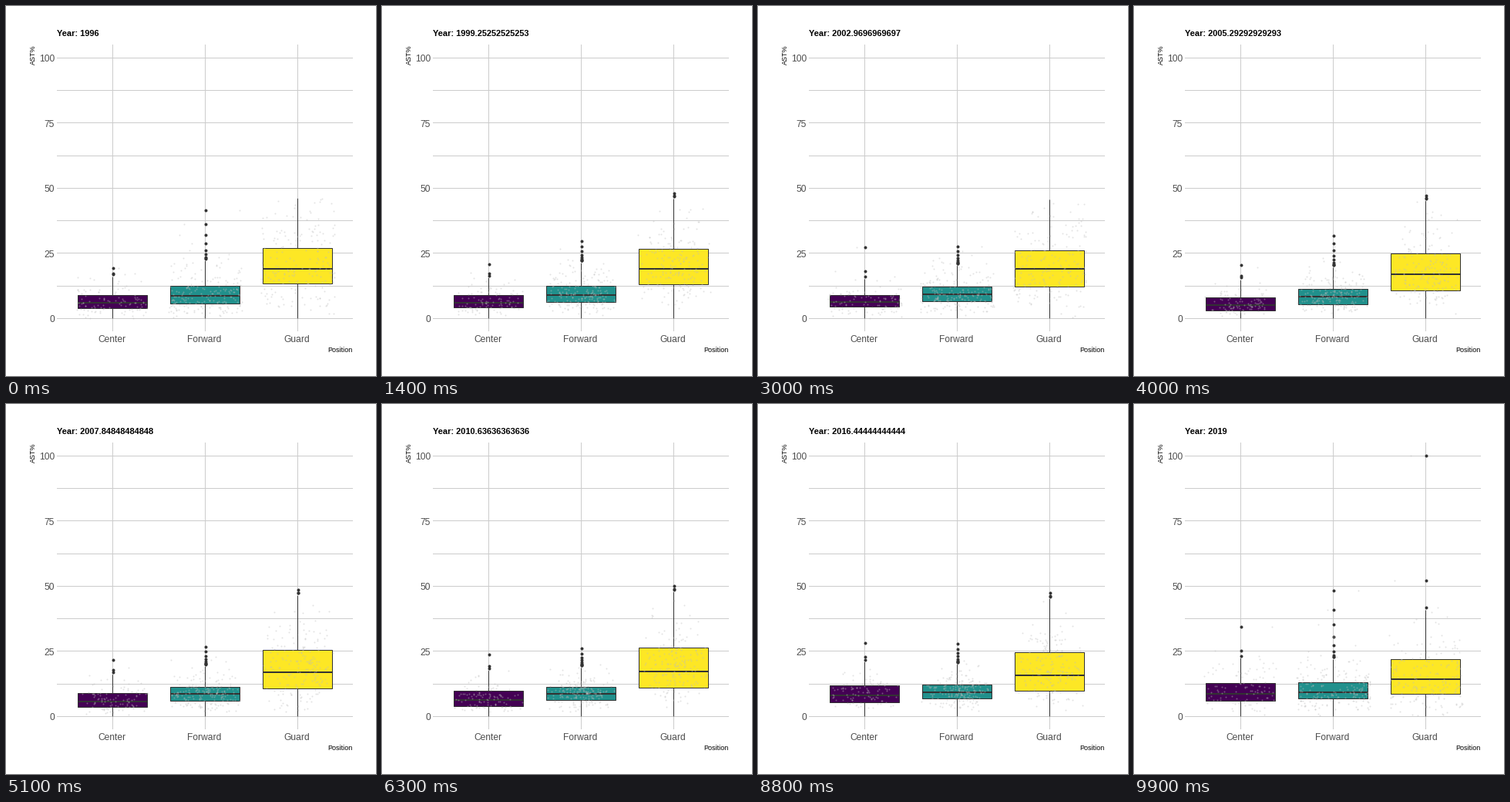
Write a matplotlib script that moves like this. It is 480x480 px and loops after 10000 ms.

```python
import matplotlib.pyplot as plt
import numpy as np
from matplotlib.animation import FuncAnimation
from matplotlib.patches import Rectangle

SIZE, DPI = 480, 80
PX = 72 / DPI  # points per pixel
FRAMES, FIRST, LAST = 100, 1996, 2019
GRID, INK, LABEL = "#cccccc", "#333333", "#4d4d4d"

plt.rcParams["font.family"] = "Liberation Sans"

YEARS = np.arange(FIRST, LAST + 1)
# Frame on which each year's data is fully reached
STOPS = np.round(np.linspace(0, FRAMES - 1, len(YEARS))).astype(int)

KEY_YEARS = [1996, 2003, 2005, 2014, 2019]


class Group:
    """Box shape at the key years, plus rules for outliers and dots."""

    def __init__(self, name, x, fill, count, n_out, reach, q1, med, q3, peak):
        self.name, self.x, self.fill, self.count = name, x, fill, count
        self.n_out, self.reach = n_out, reach
        self.quartiles = q1, med, q3
        self.peaks = dict(zip(KEY_YEARS, peak))

    def box(self, year):
        q1, med, q3 = (np.interp(year, KEY_YEARS, q) for q in self.quartiles)
        return q1, med, q3, q3 + 1.4 * (q3 - q1)

    def outliers(self, year):
        top = self.box(year)[3]
        peak = self.peaks.get(year, top * self.reach)
        if peak <= top + 1:
            return np.array([])
        curve = np.linspace(0, 1, self.n_out) ** 2.5
        return top + 1 + (peak - top - 1) * curve

    def sample(self, year, rng):
        """Jittered observations that follow the box and its outliers."""
        q1, med, q3, top = self.box(year)
        value = np.interp(rng.random(self.count),
                          [0, 0.03, 0.25, 0.5, 0.75, 0.91, 1],
                          [0, q1 * 0.35, q1, med, q3, 0.6 * q3 + 0.4 * top, top])
        tail = self.outliers(year)
        value[:len(tail)] = tail
        rng.shuffle(value)
        spread = rng.uniform(-48, 48, self.count)
        return np.column_stack([self.x + spread, ypx(value)])


GROUPS = [
    Group("Center", 138.5, "#440154", 105, 3, 1.35,
          q1=[3.9, 4.5, 3.0, 4.5, 6.0], med=[6.0, 6.3, 5.1, 7.3, 8.7],
          q3=[8.9, 8.9, 7.8, 10.7, 12.8], peak=[19.3, 27.3, 20.5, 50, 34.4]),
    Group("Forward", 258.5, "#21908c", 205, 9, 1.4,
          q1=[5.7, 6.5, 5.4, 6.5, 6.9], med=[8.7, 9.3, 8.5, 9.0, 9.3],
          q3=[12.5, 12.2, 11.3, 11.3, 13.1], peak=[41.5, 27.6, 33.5, 36.7, 48.3]),
    Group("Guard", 378.5, "#fde725", 185, 3, 1.05,
          q1=[13.4, 12.2, 10.6, 11.0, 8.6], med=[19.0, 19.0, 17.0, 17.3, 14.3],
          q3=[27.0, 26.1, 24.9, 27.0, 22.0], peak=[0, 0, 46.8, 0, 100]),
]


def ypx(value):
    return 405.4 - 3.38 * np.asarray(value, float)


def crisp(y):
    return np.floor(y) + 0.5


fig = plt.figure(figsize=(SIZE / DPI, SIZE / DPI), dpi=DPI, facecolor="white")
ax = fig.add_axes([0, 0, 1, 1])
ax.set(xlim=(0, SIZE), ylim=(SIZE, 0))
ax.axis("off")


def line(xs, ys, color=INK, width=1, z=2):
    return ax.plot(xs, ys, color=color, lw=width * PX, zorder=z,
                   solid_capstyle="butt", snap=False)[0]


def label(x, y, s, size, color="black", va="baseline", **kw):
    return ax.text(x, y, s, fontsize=size * PX, color=color, va=va, **kw)


def dots(size, color, alpha, z):
    return ax.scatter([], [], s=(size * PX) ** 2, color=color, alpha=alpha,
                      linewidths=0, zorder=z)


for v in np.arange(0, 101, 12.5):
    line([66, 450], [crisp(ypx(v))] * 2, GRID, z=1)
for v in range(0, 101, 25):
    label(63, float(ypx(v)) + 5, str(v), 12, LABEL, ha="right")

rng = np.random.default_rng(7)
for g in GROUPS:
    line([g.x] * 2, [50, 422], GRID, z=1)
    label(g.x - 1, 436, g.name, 12, LABEL, ha="center")
    g.tails = [g.outliers(year) for year in YEARS]
    g.points = [g.sample(year, rng) for year in YEARS]
    g.low = line([g.x] * 2, [0, 0])
    g.high = line([g.x] * 2, [0, 0])
    g.out = dots(4, INK, 1, 3)
    g.rect = ax.add_patch(Rectangle((g.x - 45, 0), 90, 0, fc=g.fill, ec=INK,
                                    lw=PX, zorder=4, snap=False))
    g.mid = line([g.x - 45, g.x + 45], [0, 0], width=2, z=5)
    g.dots = dots(2, "#bebebe", 0.42, 6)

label(450, 449, "Position", 9, ha="right")
label(40, 50, "AST%", 9, ha="right", va="top", rotation=90)
title = label(66, 39, "", 11, weight="bold")


def tween(a, b, t):
    """Blend equal lists; an empty side switches over at the end."""
    if len(a) != len(b):
        return b if t == 1 else a
    return a + (b - a) * t


def update(frame):
    year = FIRST + (LAST - FIRST) * frame / (FRAMES - 1)
    title.set_text(f"Year: {year:.15g}")

    i = min(int(np.searchsorted(STOPS, frame, "right")) - 1, len(STOPS) - 2)
    t = (frame - STOPS[i]) / (STOPS[i + 1] - STOPS[i])
    for g in GROUPS:
        q1, med, q3, top = ypx(g.box(i + FIRST + t))
        q1, q3 = crisp(q1), crisp(q3)
        g.low.set_ydata([q1, ypx(0)])
        g.high.set_ydata([top, q3])
        g.rect.set_y(q3)
        g.rect.set_height(q1 - q3)
        g.mid.set_ydata([round(med)] * 2)

        tail = tween(*g.tails[i:i + 2], t)
        g.out.set_offsets(np.column_stack(
            [np.full(len(tail), g.x), ypx(tail)]))
        g.dots.set_offsets(tween(*g.points[i:i + 2], t))
    return []


anim = FuncAnimation(fig, update, frames=FRAMES, interval=100, repeat=True,
                     repeat_delay=0, init_func=lambda: update(0))
plt.show()
```
